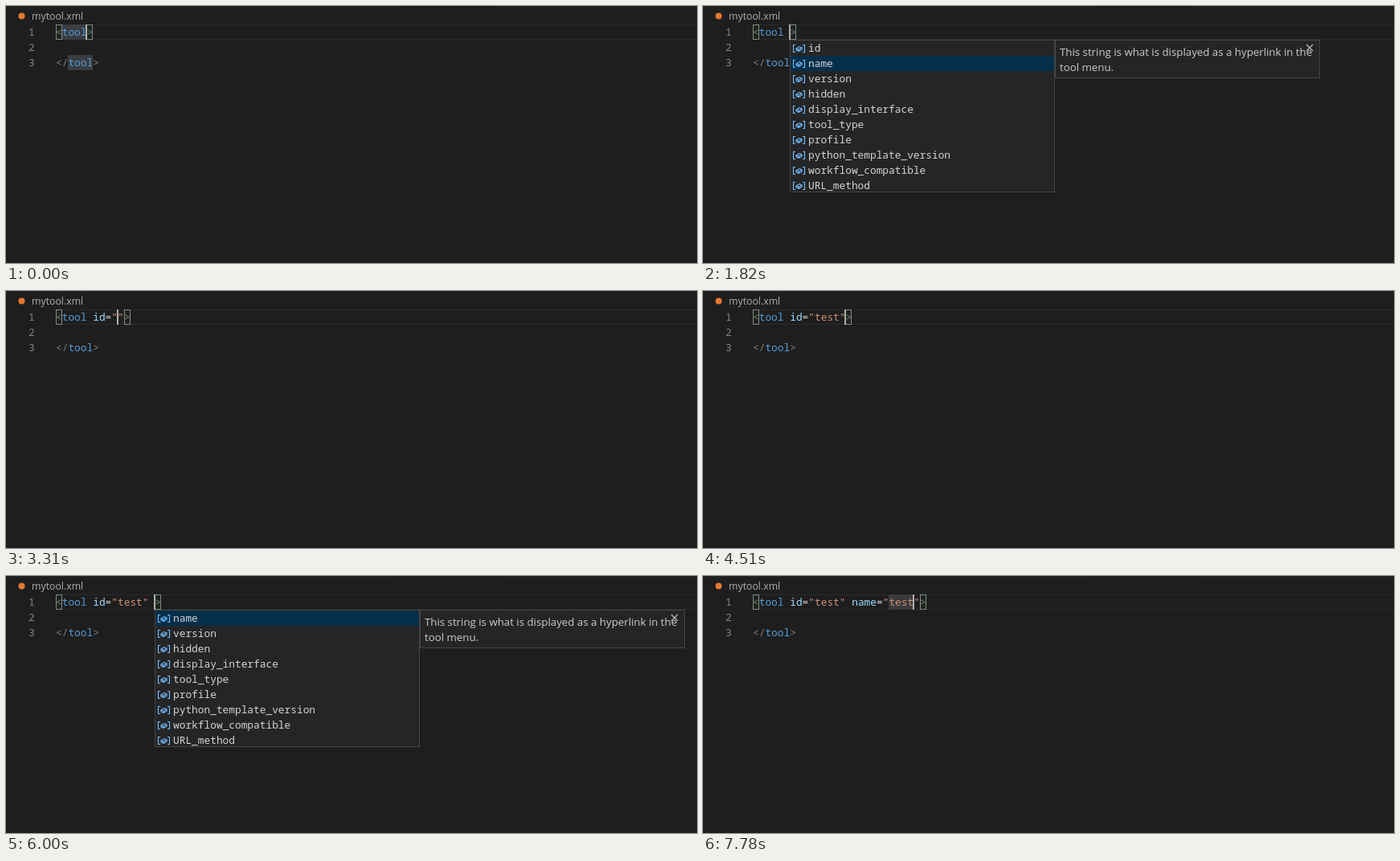
Animation of 860 by 320 pixels, one loop 8 s. Source, as an HTML page:

```html
<!DOCTYPE html>
<html lang="en">
<head>
<meta charset="utf-8">
<title>XML attribute completion</title>
<style>
  html, body { margin: 0; width: 100%; height: 100%; overflow: hidden; background: #1e1e1e; }
  svg { display: block; width: 860px; height: 320px; }
  text { white-space: pre; fill: #d4d4d4; }
  .mono { font-family: "Noto Sans Mono", "DejaVu Sans Mono", monospace; font-size: 12.83px; }
  .ui { font-family: "Open Sans", "Noto Sans", sans-serif; font-size: 13.27px; fill: #ccc; }
  .link { fill: #3794ff; }
  .icon { fill: none; stroke: #75beff; stroke-width: 1.1; }
</style>
</head>
<body>
<svg id="stage" viewBox="0 0 860 320"></svg>
<script>
const LOOP = 8000, LEFT = 62, CHAR = 7.698, ROW = 19;
const stage = document.getElementById('stage');

// [time, first line with | as caret, selected completion]
const steps = [
  [0, '<tool|>'],
  [770, '<tool |>', 'version'],
  [1820, '<tool |>', 'name'],
  [2100, '<tool |>', 'id'],
  [3310, '<tool id="|">'],
  [3990, '<tool id="te|">'],
  [4110, '<tool id="tes|">'],
  [4260, '<tool id="test|">'],
  [4510, '<tool id="test"|>'],
  [5070, '<tool id="test" |>', 'version'],
  [5750, '<tool id="test" |>', 'name'],
  [6530, '<tool id="test" name="|">'],
  [7360, '<tool id="test" name="t|">'],
  [7480, '<tool id="test" name="te|">'],
  [7630, '<tool id="test" name="tes|">'],
  [7780, '<tool id="test" name="test|">']
];
const caretOff = [[370, 770], [1290, 1820], [2350, 2750], [3840, 3990], [5600, 6000], [6930, 7360]];

const attributes = ['id', 'name', 'version', 'hidden', 'display_interface', 'tool_type',
  'profile', 'python_template_version', 'workflow_compatible', 'URL_method'];

// Each line is a list of [x offset, text, style]
const plain = lines => lines.map(s => [[6, s]]);
const docs = {
  id: plain(['Must be unique across all tools; should be lowercase',
    'and contain only letters, numbers, and underscores.',
    'It allows for tool versioning and metrics of the',
    'number of times a tool is used, among other', 'things.']),
  name: plain(['This string is what is displayed as a hyperlink in the', 'tool menu.']),
  version: [
    ...plain(['This string allows for tool versioning and should be',
      'increased with each new version of the tool. The']),
    [[6, 'value should follow the'], [153, 'PEP 440', 'link'], [206, 'specification. It']],
    [[6, 'defaults to'], [81, '1.0.0', 'code'], [129, 'if it is not included in the tag.']]
  ]
};

const colX = col => Math.round(LEFT + CHAR * col);
const rect = (x, y, w, h, fill) => `<rect x="${x}" y="${y}" width="${w}" height="${h}" fill="${fill}"/>`;
const frame = (x, y, w, h, fill, stroke) =>
  `<rect x="${x + .5}" y="${y + .5}" width="${w - 1}" height="${h - 1}" fill="${fill}" stroke="${stroke}"/>`;
const text = (x, y, s, cls = 'mono', attrs = '') => `<text x="${x}" y="${y}" class="${cls}" ${attrs}>${s}</text>`;

function tokenColor(token) {
  if (token[0] === '"') return '#ce9178';
  if (/[<>]/.test(token)) return '#808080';
  return token === 'tool' ? '#569cd6' : '#9cdcfe';
}

const highlight = code => code.replace(/"[^"]*"|<\/?|>|\w+(?==)|tool/g, token =>
  `<tspan fill="${tokenColor(token)}">${token.replace('<', '&lt;').replace('>', '&gt;')}</tspan>`);

function list(x, items, picked) {
  const height = items.length * ROW;
  let out = rect(x, 42, 330, height, '#252526');
  items.forEach((name, i) => {
    const y = 43 + i * ROW;
    if (name === picked) out += rect(x + 1, y, 328, ROW, '#062f4a');
    out += `<path class="icon" transform="translate(${x + 4} ${y + 5})"
      d="M3 .5H.5v9H3M12 .5h2.5v9H12M4 5l4-2.5 3 1.3v2.4l-4 2.1-3-1.3zM4 5l3 1.2 4-2.2M7 6.2v2"/>`;
    out += text(x + 23, y + 14, name);
  });
  return out + frame(x, 42, 330, height, 'none', '#454545');
}

function docPanel(x, lines) {
  let out = frame(x, 42, 330, Math.round(lines.length * 19.25 + 9.5), '#252526', '#454545');
  lines.forEach((line, i) => {
    const y = 62 + i * ROW;
    for (const [dx, s, style] of line) {
      if (style === 'code') {
        out += `<rect x="${x + dx - 4}" y="${y - 13}" width="48" height="18" rx="3" fill="#1a1a1b"/>`;
        out += text(x + dx, y, s, 'mono', 'font-weight="600"');
      } else {
        out += text(x + dx, y, s, style ? 'ui ' + style : 'ui');
      }
    }
  });
  return out + `<path d="M${x + 313} 48l8 8m0-8l-8 8" stroke="#c5c5c5" stroke-width="1.1"/>`;
}

function draw([, line, picked], caretOn) {
  const col = line.indexOf('|');
  const code = line.replace('|', '');
  const typed = line.match(/"(\w*)\|/);
  const bracket = c => frame(colX(c), 23, 8, ROW, 'rgba(0,100,0,.1)', '#888');

  let out = rect(0, 0, 487, 1, '#252526') + rect(612, 0, 248, 1, '#252526');
  out += '<circle cx="19.5" cy="12.5" r="4" fill="#e37933"/>';
  out += text(32, 17, 'mytool.xml', 'ui', 'style="font-size:12.3px;fill:#b0b0b0"');
  out += rect(LEFT, 23, 798, 1, '#2a2a2a') + rect(LEFT, 41, 798, 1, '#2a2a2a');

  if (col === 5) out += rect(70, 23, 31, ROW, '#3a3d41') + rect(77, 61, 31, ROW, '#3a3d41');
  if (typed) {
    const n = typed[1].length;
    out += rect(colX(col - n), 23, colX(col) - colX(col - n), ROW, '#3a3a3a');
  }

  for (let i = 0; i < 3; i++) out += text(28, 37 + i * ROW, i + 1, 'mono', 'style="fill:#858585"');
  out += bracket(0) + bracket(code.length - 1);
  out += text(LEFT, 37, highlight(code)) + text(LEFT, 75, highlight('</tool>'));
  if (caretOn) out += rect(colX(col) - 1, 23, 2, ROW, '#aeafad');

  if (picked) {
    const x = colX(col);
    out += list(x, attributes.filter(a => !code.includes(a + '=')), picked);
    out += docPanel(x + 330, docs[picked]);
  }
  stage.innerHTML = out;
}

let shown = '';
function tick() {
  const t = performance.now() % LOOP;
  const index = steps.filter(s => s[0] <= t).length - 1;
  const caretOn = !caretOff.some(([from, to]) => t >= from && t < to);
  const key = index + ':' + caretOn;
  if (key !== shown) {
    shown = key;
    draw(steps[index], caretOn);
  }
  requestAnimationFrame(tick);
}
tick();
</script>
</body>
</html>
```
